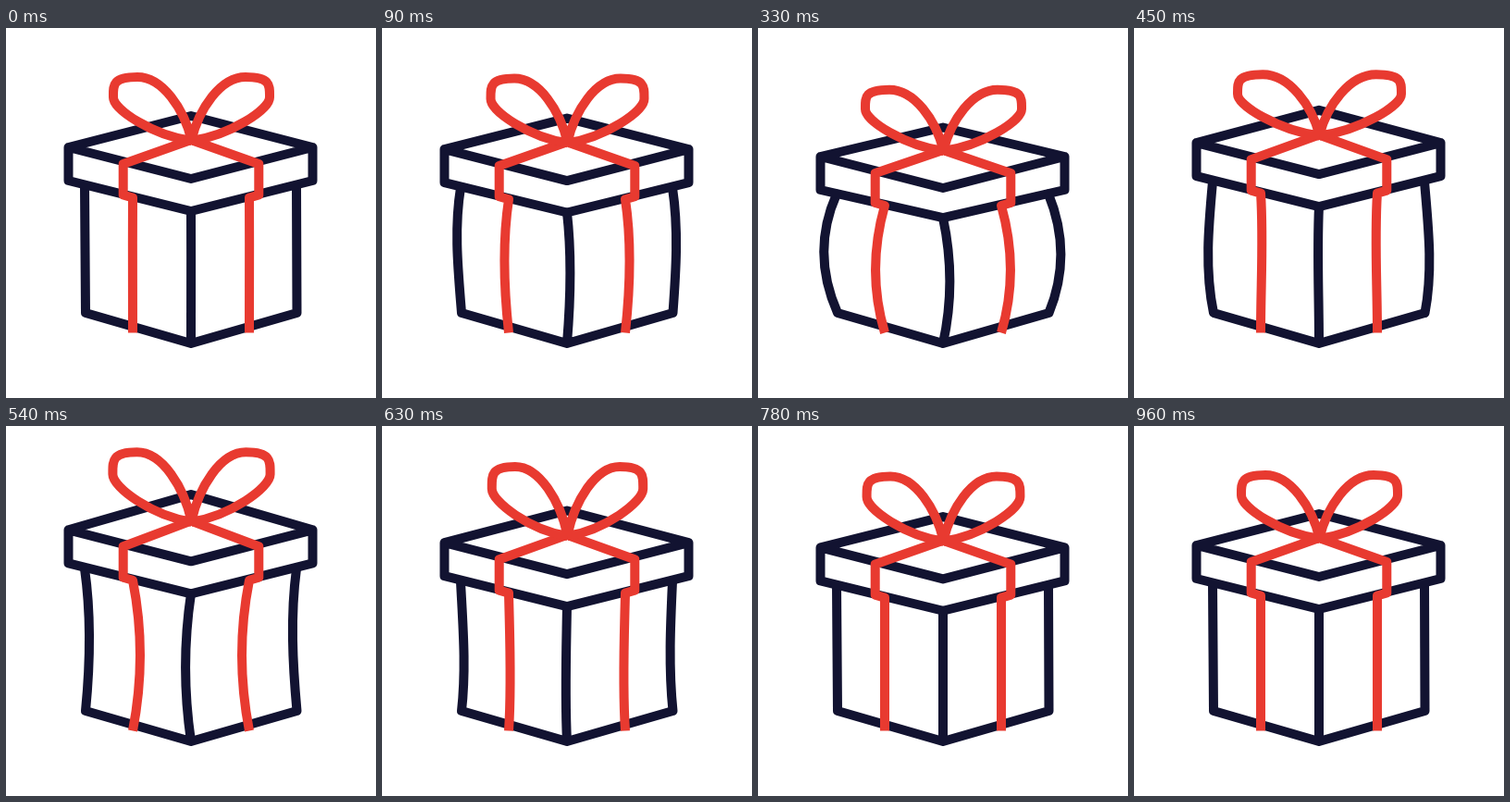
These frames come from a looping animation (400x400 px, 990 ms). An HTML page:

```html
<!DOCTYPE html>
<html lang="en">
<head>
<meta charset="utf-8">
<title>Gift box</title>
<style>
  html, body { margin: 0; width: 100%; height: 100%; overflow: hidden; background: #fff; }
  svg { display: block; width: 100%; height: 100%; }
  path { fill: none; stroke-width: 10; stroke-linejoin: round; }
  .box { stroke: #121331; stroke-linecap: round; }
  .ribbon { stroke: #e83a30; }
</style>
</head>
<body>
<svg viewBox="0 0 400 400">
  <path id="body" class="box"/>
  <path id="lid" class="box"/>
  <path id="straps" class="ribbon"/>
  <path id="bow" class="ribbon"/>
</svg>
<script>
const LOOP = 990, STEP = 30;
const PRESSED = 330, PEAK = 555, LANDED = 675, REST = 960;

const ease = u => (1 - Math.cos(Math.PI * Math.min(1, Math.max(0, u)))) / 2;

// Eases from value to value through [time, value] stops.
function track(t, start, ...stops) {
  let from = 0, value = start;
  for (const [to, next] of stops) {
    value += (next - value) * ease((t - from) / (to - from));
    if (t < to) break;
    from = to;
  }
  return value;
}

const drop = t => track(t, 0, [PRESSED - 30, 10], [PRESSED, 10], [PEAK, -17], [LANDED, 3.5], [REST, 0]);
const bowWidth = t => track(t, 1, [210, 0.953], [450, 1.047], [630, 0.967], [REST, 1]);
const bowHeight = t => track(t, 1, [210, 1.025], [PRESSED, 0.96], [450, 0.96], [PEAK, 1.1], [870, 1]);

// Bulge of the walls: 1 when pressed, -inward when stretched.
const bulge = (t, inward) => track(t, 0, [210, 1], [PRESSED, 1], [PEAK, -inward], [LANDED, 0]);

// Upright line from (x0, y0) to (x1, y1), bent sideways at its thirds.
function bent(x0, y0, x1, y1, upper, lower) {
  const h = (y1 - y0) / 3;
  return `${x0} ${y0}C${x0 + upper} ${y0 + h} ${x1 + lower} ${y1 - h} ${x1} ${y1}`;
}

function loop(dir, knot, sx, sy) {
  const p = (x, y) => `${200.5 + dir * x * sx} ${knot - y * sy}`;
  return `M${p(0, 0)}C${p(8, 33)} ${p(31, 68)} ${p(58.5, 68)}`
    + `S${p(84.5, 59)} ${p(84.5, 46)}S${p(42, 5)} ${p(0, -1)}`;
}

function strap(dir, knot, y, under, upper, lower) {
  const x = 200 + dir * 63, edge = 200 + dir * 73.3;
  return `M200 ${knot}L${edge} ${147 + y}V${180.5 + under}L${x} ${183.5 + under}L`
    + bent(x, 183.5 + under, x, 329.5, dir * upper, dir * lower);
}

const set = (id, d) => document.getElementById(id).setAttribute('d', d);

function draw(t) {
  const y = drop(t);
  const squash = Math.max(0, y);
  const under = y - squash * 0.15, front = 198 + y - squash * 0.28;
  const knot = 121 + y * 1.1, back = 95 + y * 1.25;

  // Sides trail the lid slightly; straps and front edge lead it.
  const top = bulge(t, 0.4), low = bulge(t - 30, 0.4);
  const lead = bulge(t + 20, 0.8), mid = bulge(t, 0.8);

  set('body', 'M' + bent(85, 171 + under, 86, 308, -19 * top, -19 * low)
    + 'L200 341L314.5 308'
    + 'M' + bent(314, 171 + under, 314.5, 308, 17.5 * top, 17.5 * low)
    + 'M' + bent(200, front, 200, 341, 10 * lead, 10 * mid));

  set('lid', `M67.5 ${129 + y}L200 ${back}L331.5 ${129 + y}L200 ${163 + y}Z`
    + `V${165 + y}L200 ${front}L331.5 ${165 + y}V${129 + y}`);

  set('straps', [-1, 1].map(dir => strap(dir, knot, y, under, 13.5 * lead, 13.5 * mid)).join(''));
  set('bow', [-1, 1].map(dir => loop(dir, knot, bowWidth(t), bowHeight(t))).join(''));
}

function tick() {
  const t = performance.now() % LOOP;
  draw(Math.floor(t / STEP) * STEP);
  requestAnimationFrame(tick);
}
tick();
</script>
</body>
</html>
```
